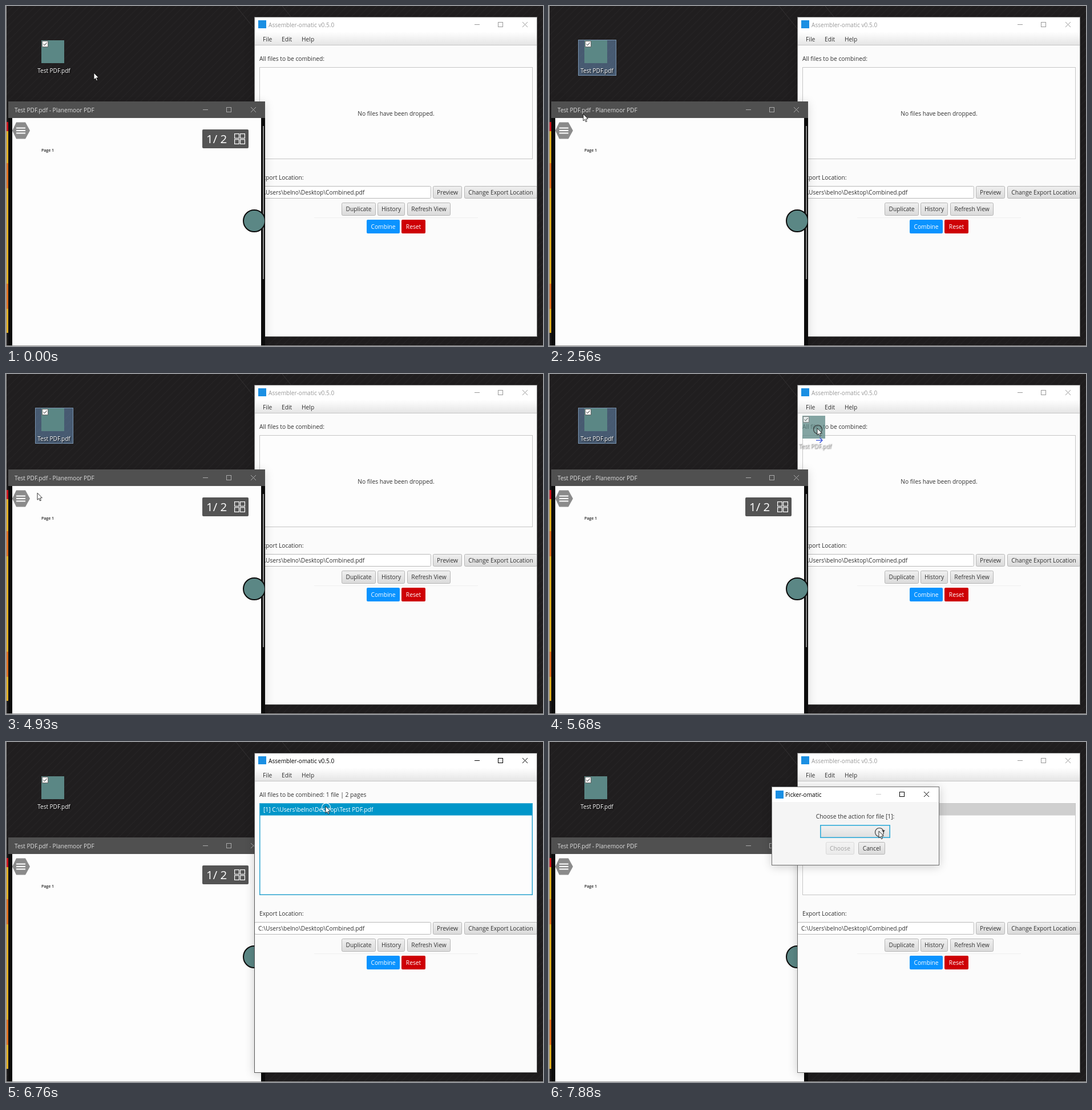
An HTML page with a canvas that plays this animation: 941 px wide and 595 px high, repeating every 8000 ms.

```html
<!DOCTYPE html>
<html lang="en">
<head>
<meta charset="utf-8">
<title>Combining files</title>
<style>
html, body { margin: 0; width: 100%; height: 100%; overflow: hidden; background: #201e1f; }
canvas { display: block; }
</style>
</head>
<body>
<canvas id="stage" width="941" height="595"></canvas>
<script>
const g = document.getElementById('stage').getContext('2d');
const LOOP = 8000, STEP = 137;
const FONT = '"Open Sans", "Noto Sans", sans-serif';
const TEAL = '#5b8785', BLUE = '#1a8fe3', PAPER = '#fdfdfd';
const FOLDER = 'C:\\Users\\belno\\Desktop\\';

const DESELECT = 800, SELECT = 2020, DRAG = 5380, DROP = 6200;
const RAISE = 6490, DIALOG = 7340;

// Each gesture starts at a time, lasts some steps and visits evenly timed points
const GESTURES = [
  { at: 0, steps: 1, via: [[154, 117]] },
  { at: 150, steps: 8, via: [[150, 114], [90, 88], [128, 106]] },
  { at: 1200, steps: 4, via: [[66, 46], [136, 95], [47, 85]] },
  { at: SELECT, steps: 8, via: [[84, 90], [20, 178], [60, 189], [128, 186], [30, 186]] },
  { at: 3130, steps: 8, via: [[40, 225], [402, 228], [402, 228]] },
  { at: 4240, steps: 8, via: [[300, 236], [44, 250], [88, 83]] },
  { at: DRAG, steps: 8, via: [[130, 86], [470, 95], [520, 125], [556, 150], [560, 120]] },
  { at: RAISE, steps: 4, via: [[560, 113], [560, 112]] },
  { at: DIALOG, steps: 4, via: [[560, 114], [578, 156]] }
];

const during = (t, a, b) => t >= a && t < b;
const inside = ([px, py], x, y, w, h) => during(px, x, x + w) && during(py, y, y + h);

// The picture advances in steps inside a gesture and rests between gestures
function poseAt(time) {
  const { at, steps, via } = GESTURES.findLast(m => m.at <= time);
  const last = steps === 8 ? 7 : steps;
  const k = Math.min(last, Math.floor((time - at) / STEP + 0.15));
  const u = k / steps * (via.length - 1);
  const i = Math.floor(u);
  const a = via[i], b = via[i + 1] ?? a;
  return { t: at + k * STEP, cursor: a.map((v, j) => v + (b[j] - v) * (u - i)) };
}

function rect(x, y, w, h, color) {
  g.fillStyle = color;
  g.fillRect(x, y, w, h);
}

function frame(x, y, w, h, color, width = 1) {
  g.strokeStyle = color;
  g.lineWidth = width;
  g.strokeRect(x + width / 2, y + width / 2, w - width, h - width);
}

function trace(points) {
  g.beginPath();
  points.forEach(([x, y]) => g.lineTo(x, y));
}

function line(points, color, width = 1) {
  trace(points);
  g.strokeStyle = color;
  g.lineWidth = width;
  g.stroke();
}

function shape(points, color) {
  trace(points);
  g.closePath();
  g.fillStyle = color;
  g.fill();
}

function round(x, y, w, h, fill, stroke) {
  const inset = stroke ? 0.5 : 0;
  g.beginPath();
  g.roundRect(x + inset, y + inset, w - 2 * inset, h - 2 * inset, 2);
  g.fillStyle = fill;
  g.fill();
  if (!stroke) return;
  g.strokeStyle = stroke;
  g.lineWidth = 1;
  g.stroke();
}

function text(str, x, y, color = '#333', size = 10.25, align = 'left', weight = 400) {
  g.font = `${weight} ${size}px ${FONT}`;
  g.textAlign = align;
  g.fillStyle = color;
  g.fillText(str, x, y);
}

function fade(y, h, top, bottom) {
  const grad = g.createLinearGradient(0, y, 0, y + h);
  grad.addColorStop(0, top);
  grad.addColorStop(1, bottom);
  return grad;
}

function panel(x, y, w, h, color, alpha) {
  g.save();
  g.shadowColor = `rgba(0,0,0,${alpha})`;
  g.shadowBlur = 16;
  g.shadowOffsetY = 2;
  rect(x, y, w, h, color);
  g.restore();
}

function button(label, x, y, w, h = 22) {
  round(x, y, w, h, fade(y, h, '#f0f0f0', '#dadada'), '#b6b6b6');
  text(label, x + w / 2, y + 15, '#333', 10.25, 'center');
}

function flatButton(label, x, w, color) {
  round(x, 374, w, 24, color);
  text(label, x + w / 2, 389.5, '#fff', 10.25, 'center');
}

function controls(right, y, color, minColor = color) {
  const [min, max, close] = [right - 93, right - 52, right - 9];
  line([[min, y + 0.5], [min + 9, y + 0.5]], minColor);
  frame(max, y - 4, 9, 9, color);
  line([[close, y - 4], [right, y + 5]], color);
  line([[right, y - 4], [close, y + 5]], color);
}

function desktop() {
  rect(0, 0, 941, 595, '#201e1f');
  for (let x = -595; x < 941; x += 13) line([[x, 595], [x + 595, 0]], '#252324', 1.5);
  for (const x of [403, 484]) line([[x, 0], [x + 34, 42]], '#353334');
  rect(0, 203, 4, 369, '#f0ba22');
  rect(0, 203, 4, 16, '#d8141c');
  for (const y of [275, 486]) rect(0, y, 4, 44, '#ee751c');
}

function checkbox(x, y) {
  rect(x, y, 11, 11, '#fff');
  frame(x, y, 11, 11, '#666');
  line([[x + 2.5, y + 5.5], [x + 4.5, y + 7.8], [x + 8.7, y + 3]], '#222');
}

function file(dx, dy, checked, alpha = 1) {
  g.save();
  g.translate(dx, dy);
  g.globalAlpha = alpha;
  rect(62, 60, 40, 40, TEAL);
  if (checked) checkbox(63, 61);
  g.shadowColor = '#000';
  g.shadowBlur = 2;
  g.shadowOffsetX = g.shadowOffsetY = 1;
  text('Test PDF.pdf', 84, 117, '#fff', 10, 'center');
  g.restore();
}

function desktopFile(t, cursor) {
  const box = [51, 59, 67, 63];
  const lit = during(t, SELECT, RAISE);
  if (lit || inside(cursor, ...box)) {
    rect(...box, lit ? 'rgba(110,150,195,.5)' : 'rgba(150,180,215,.25)');
    frame(...box, lit ? '#7892ad' : '#566271');
  }
  file(0, 0, t < DESELECT || t >= SELECT);
}

function pageCounter(cursor) {
  round(344, 216, 81, 33, '#545454');
  if (inside(cursor, 393, 216, 32, 33)) rect(393, 216, 32, 33, '#9a9a9a');
  text('1/ 2', 351, 240, '#fff', 20.5);
  for (const x of [400, 410]) for (const y of [223, 233]) frame(x, y, 9, 9, '#fff', 1.2);
}

function menuBadge(x, y) {
  const corners = [[-15, 0], [-8, -14.5], [8, -14.5], [16, 0], [8, 14.5], [-8, 14.5]];
  shape(corners.map(([cx, cy]) => [x + cx, y + cy]), '#8b8b8b');
  for (const dy of [-4.5, 0, 4.5]) line([[x - 8, y + dy], [x + 8, y + dy]], '#fff', 2);
}

function viewer(t, cursor) {
  panel(4, 167, 450, 440, '#0c0c0c', 0.14);
  rect(4, 167, 450, 29, '#505050');
  text('Test PDF.pdf - Planemoor PDF', 15, 186, '#dcdcdc', 10.1);
  controls(438, 181, '#aaa');
  rect(11, 196, 436, 399, PAPER);
  rect(450, 210, 2, 268, '#8c8c8c');
  menuBadge(26, 218);
  text('Page 1', 62, 255, '#222', 7, 'left', 600);
  if (t < DESELECT || during(t, 3500, 6880)) pageCounter(cursor);

  g.save();
  g.beginPath();
  g.rect(4, 196, 450, 399);
  g.clip();
  g.beginPath();
  g.arc(435, 376, 19, 0, 7);
  g.fillStyle = TEAL;
  g.fill();
  g.strokeStyle = '#0b0b0b';
  g.lineWidth = 2;
  g.stroke();
  g.restore();
}

function fileList(t) {
  const focused = during(t, RAISE, DIALOG);
  rect(444, 107, 479, 161, PAPER);
  if (t >= RAISE) rect(444, 107, 478, 21.5, focused ? '#0096c9' : '#cfcfcf');
  frame(444, 107, 479, 161, focused ? '#2aa3cf' : '#c6c6c6', focused ? 1.5 : 1);
  if (t < DROP) text('No files have been dropped.', 683.5, 192, '#333', 10.25, 'center');
  else text(`[1] ${FOLDER}Test PDF.pdf`, 451, 122, focused ? '#fff' : '#333');
}

function combiner(t) {
  const active = during(t, RAISE, DIALOG);
  const ink = active ? '#000' : '#999';
  panel(435, 19, 496, 560, '#fbfbfb', 0.2);
  g.save();
  g.beginPath();
  g.rect(435, 19, 496, 560);
  g.clip();
  rect(435, 19, 496, 27, '#fff');
  rect(442, 25, 14, 14, BLUE);
  text('Assembler-omatic v0.5.0', 460, 37, ink, 10.1);
  controls(914, 32, ink);

  rect(435, 46, 496, 22, fade(46, 22, '#fefefe', '#e5e5e5'));
  rect(435, 68, 496, 1, '#c6c6c6');
  text('File', 450, 62);
  text('Edit', 483, 62);
  text('Help', 518, 62);

  text('All files to be combined:' + (t < DROP ? '' : ' 1 file | 2 pages'), 444, 96);
  fileList(t);

  text('Export Location:', 444, 304);
  round(435, 315, 310, 22, '#fff', '#b9b9b9');
  text(FOLDER + 'Combined.pdf', 442, 330);
  button('Preview', 748, 315, 51);
  button('Change Export Location', 803, 315, 128);
  button('Duplicate', 588, 344, 60, 23);
  button('History', 651, 344, 48, 23);
  button('Refresh View', 703, 344, 76, 23);
  rect(540, 370, 287, 1, '#efefef');
  flatButton('Combine', 632, 58, '#0a93ff');
  flatButton('Reset', 693, 42, '#ce0005');
  g.restore();
  frame(435, 19, 496, 560, active ? '#555' : '#777');
}

function dialog(t) {
  const k = Math.min(1, (t - DIALOG + 90) / 200);
  const zoom = 0.9 + 0.1 * k;
  g.save();
  g.globalAlpha = k;
  g.translate(536.5, 146.5);
  g.scale(zoom, zoom);
  g.translate(-536.5, -146.5);
  panel(390, 78, 294, 138, '#f5f5f5', 0.2);
  rect(390, 78, 294, 27, '#fff');
  frame(390, 78, 294, 138, '#6f6f6f');
  rect(397, 85, 14, 14, BLUE);
  text('Picker-omatic', 414, 95.5, '#000', 10.1);
  controls(666, 91, '#000', '#ccc');
  text('Choose the action for file [1]:', 536.5, 134, '#333', 10.25, 'center');
  rect(475, 145, 123, 23, fade(145, 23, '#f3f3f3', '#dedede'));
  frame(475, 145, 123, 23, '#2fabd9', 1.6);
  shape([[583, 154.5], [589, 154.5], [586, 158]], '#333');
  button('Cancel', 542, 175, 47);
  g.globalAlpha = 0.4 * k;
  button('Choose', 485, 175, 50);
  g.restore();
}

function moveArrow(x, y) {
  line([[x, y], [x + 10.5, y]], '#2340d8', 1.2);
  line([[x + 6.5, y - 4.5], [x + 11, y], [x + 6.5, y + 4.5]], '#2340d8', 1.2);
}

function pointer(t, [x, y]) {
  const dragging = during(t, DRAG, DROP);
  if (dragging) {
    file(x - 88, y - 82, true, 0.75);
    moveArrow(x - 2, y + 21);
  }
  const pressed = dragging || during(t, RAISE, 6600) || during(t, 6750, 6880) || t > 7870;
  if (pressed) {
    g.beginPath();
    g.arc(x + 1, y + 2, 7.5, 0, 7);
    g.strokeStyle = during(t, RAISE, DIALOG) ? '#fff' : '#333';
    g.lineWidth = 1.1;
    g.stroke();
  }
  const arrow = [[0, 0], [0, 12], [2.7, 9.5], [4.5, 13.7], [6.4, 12.9], [4.6, 8.8], [8.3, 8.5]];
  shape(arrow.map(([px, py]) => [x + px, y + py]), '#fff');
  g.strokeStyle = '#000';
  g.lineWidth = 0.8;
  g.stroke();
}

function draw(time) {
  const { t, cursor } = poseAt(time % LOOP);
  const windows = [() => combiner(t), () => viewer(t, cursor)];
  if (t >= RAISE) windows.reverse();
  desktop();
  desktopFile(t, cursor);
  windows.forEach(paint => paint());
  if (t >= DIALOG) dialog(t);
  frame(0, -1, 942, 596, '#999');
  pointer(t, cursor);
}

let start;
function tick(now) {
  start ??= now;
  draw(now - start);
  requestAnimationFrame(tick);
}
requestAnimationFrame(tick);
</script>
</body>
</html>
```
